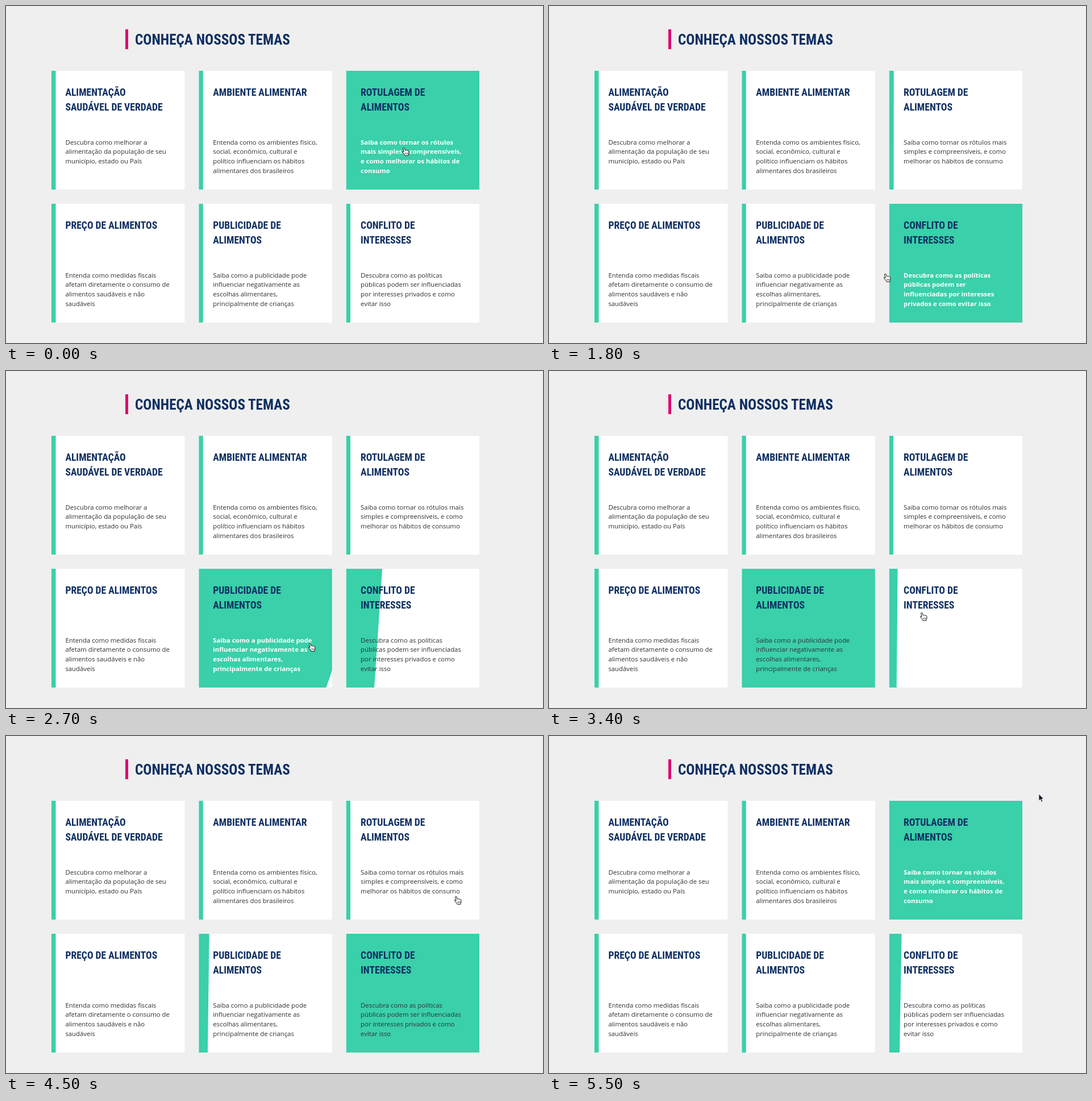
An HTML page that plays this animation: 945 px wide and 593 px high, repeating every 5600 ms.

```html
<!DOCTYPE html>
<html lang="pt-BR">
<head>
<meta charset="utf-8">
<title>Temas</title>
<style>
  html, body { margin: 0; width: 100%; height: 100%; overflow: hidden; background: #efefef; }
  svg { display: block; width: 945px; height: 593px; }
  .title { font: 700 17.65px "Roboto Condensed", Roboto, sans-serif; font-stretch: 75%; fill: #0f2f62; }
  .heading { font-size: 25.1px; }
  .body { font: 400 11.35px "Open Sans", "Noto Sans", sans-serif; fill: #303036; }
  .strong { font-weight: 700; fill: #fff; }
</style>
</head>
<body>
<svg viewBox="0 0 945 593">
  <rect width="945" height="593" fill="#efefef"/>
  <rect x="210" y="41" width="5" height="35" fill="#db0a70"/>
  <text class="title heading" x="227" y="68">CONHEÇA NOSSOS TEMAS</text>
  <g id="cards"></g>
  <g id="hand" stroke="#111" stroke-width="1" stroke-linejoin="round">
    <path fill="#fff" d="M-4.5-6q1.3-2 2.6 0l1.2 4q1-1 2.2.1q1.2-.9 2.2.3q1.4-.6 2 .8l.3 3q.1 2-1 3.4v1.6h-6l-.5-1.4-4-5q-.3-1.8 1.6-1l1 .8z"/>
    <path fill="none" stroke-width=".7" d="M0 2v3M2 2v3M4 2v3"/>
  </g>
  <path id="arrow" d="M862 102v12.2l2.8-2.6 2 4.6 2.1-.9-2-4.5h3.8z" fill="#0b1424" stroke="#fff" stroke-width=".8"/>
</svg>
<script>
const LOOP = 5600, STEP = 100, SWEEP = 1500;
const CARD_W = 234.5, CARD_H = 209, EDGE = 7.5, FULL = CARD_W * 1.5;
const $ = id => document.getElementById(id);

// hover: [time, 1 = pointer enters, 0 = pointer leaves]
const themes = [
  { title: "ALIMENTAÇÃO/SAUDÁVEL DE VERDADE",
    body: "Descubra como melhorar a/alimentação da população de seu/município, estado ou País" },
  { title: "AMBIENTE ALIMENTAR",
    body: "Entenda como os ambientes físico,/social, econômico, cultural e/político influenciam os hábitos/alimentares dos brasileiros" },
  { title: "ROTULAGEM DE/ALIMENTOS",
    body: "Saiba como tornar os rótulos mais/simples e compreensíveis, e como/melhorar os hábitos de consumo",
    strong: "Saiba como tornar os rótulos/mais simples e compreensíveis,/e como melhorar os hábitos de/consumo",
    hover: [[-SWEEP, 1], [395, 0], [4510, 1]] },
  { title: "PREÇO DE ALIMENTOS",
    body: "Entenda como medidas fiscais/afetam diretamente o consumo de/alimentos saudáveis e não/saudáveis" },
  { title: "PUBLICIDADE DE/ALIMENTOS",
    body: "Saiba como a publicidade pode/influenciar negativamente as/escolhas alimentares,/principalmente de crianças",
    hover: [[1920, 1], [3335, 0]] },
  { title: "CONFLITO DE/INTERESSES",
    body: "Descubra como as políticas/públicas podem ser influenciadas/por interesses privados e como/evitar isso",
    strong: "Descubra como as políticas/públicas podem ser/influenciadas por interesses/privados e como evitar isso",
    hover: [[443, 1], [1888, 0], [3345, 1], [4383, 0]] }
];

// pointer centre: [time, x, y]
const pointerPath = [
  [0, 703, 256], [200, 702, 262], [400, 696, 332], [500, 690, 390], [700, 682, 446],
  [1000, 679, 460], [1500, 664, 470], [1800, 595, 478], [2000, 552, 484], [2700, 538, 486],
  [3200, 546, 482], [3300, 582, 466], [3400, 659, 432], [3600, 712, 418], [4100, 752, 410],
  [4300, 772, 378], [4500, 795, 289], [4900, 803, 244], [5400, 816, 160]
];

const lines = (text, cls, x, y, step) => `<g class="${cls}">` +
  text.split("/").map((line, i) => `<text x="${x}" y="${y + i * step}">${line}</text>`).join("") + "</g>";

$("cards").innerHTML = themes.map((theme, i) => {
  const column = i % 3, x = 80 + column * 259.25, y = i < 3 ? 114 : 348, tx = 104.4 + column * 259.85;
  return `<clipPath id="clip${i}"><rect x="${x}" y="${y}" width="${CARD_W}" height="${CARD_H}"/></clipPath>
    <g class="card" data-x="${x}" data-y="${y}">
      <rect x="${x}" y="${y}" width="${CARD_W}" height="${CARD_H}" fill="#fff"/>
      <path class="sweep" clip-path="url(#clip${i})" fill="#3ad0a9"/>
      ${lines(theme.title, "title", tx, y + 44, 26)}
      ${lines(theme.body, "body plain", tx, y + 129.5, 16.8)}
      ${lines(theme.strong || theme.body, "body strong", tx, y + 129.5, 16.8)}
    </g>`;
}).join("");

const cards = [...document.querySelectorAll(".card")].map((el, i) => ({
  x: +el.dataset.x, y: +el.dataset.y, hover: themes[i].hover || [],
  sweep: el.querySelector(".sweep"), plain: el.querySelector(".plain"), strong: el.querySelector(".strong")
}));

// CSS "ease": cubic-bezier(.25, .1, .25, 1)
function ease(p) {
  if (p >= 1) return 1;
  const bezier = (s, a, b) => 3 * s * (1 - s) ** 2 * a + 3 * s * s * (1 - s) * b + s ** 3;
  let low = 0, high = 1;
  for (let i = 0; i < 24; i++) {
    const mid = (low + high) / 2;
    if (bezier(mid, .25, .25) < p) low = mid; else high = mid;
  }
  return bezier(low, .1, 1);
}

function drawCard(card, t) {
  const [start, on] = card.hover.filter(([time]) => time <= t).pop() || [-SWEEP, 0];
  const progress = ease((t - start) / SWEEP);
  const width = FULL * (on ? progress : 1 - progress);
  const { x, y } = card;
  card.sweep.setAttribute("d",
    `M${x} ${y}H${x + EDGE + width}L${x + EDGE + width * .75} ${y + CARD_H}H${x}Z`);
  card.plain.style.display = on ? "none" : "";
  card.strong.style.display = on ? "" : "none";
}

function drawPointer(t) {
  const outside = t >= 5500;
  $("arrow").style.display = outside ? "" : "none";
  $("hand").style.display = outside ? "none" : "";
  if (outside) return;
  const next = Math.max(1, pointerPath.findIndex(([time]) => time >= t));
  const [t0, x0, y0] = pointerPath[next - 1], [t1, x1, y1] = pointerPath[next];
  const p = (t - t0) / (t1 - t0);
  $("hand").setAttribute("transform", `translate(${x0 + (x1 - x0) * p} ${y0 + (y1 - y0) * p})`);
}

const begin = performance.now();
function draw() {
  const t = Math.floor((performance.now() - begin) % LOOP / STEP) * STEP;
  cards.forEach(card => drawCard(card, t));
  drawPointer(t);
  requestAnimationFrame(draw);
}
draw();
</script>
</body>
</html>
```
